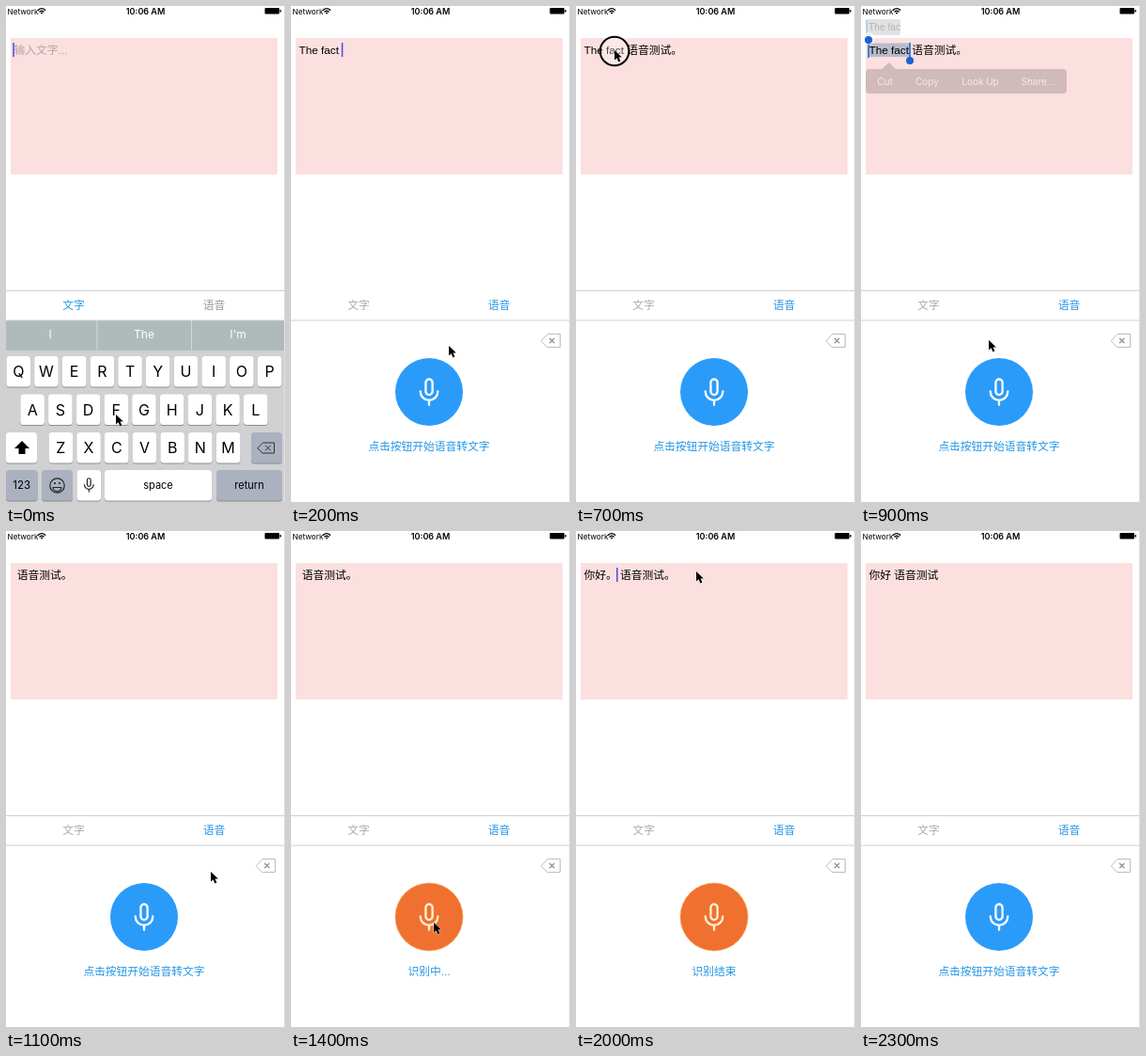
Write an HTML page that moves like this. It is 297 px wide and 528 px high and loops after 2.4 s.

```html
<!DOCTYPE html>
<html lang="zh-CN">
<head>
<meta charset="utf-8">
<title>Text and voice input</title>
<style>
html, body { margin: 0; width: 100%; height: 100%; overflow: hidden; background: #fff; }
svg { display: block; width: 297px; height: 528px; }
text { font: 11.75px "Liberation Sans", "Noto Sans CJK SC", "Noto Sans CJK", sans-serif; white-space: pre; }
.ui { font-family: Inter, "Noto Sans", sans-serif; }
.line { fill: none; stroke-linecap: round; stroke-linejoin: round; }
</style>
</head>
<body>
<svg id="stage" viewBox="0 0 297 528"></svg>
<script>
const LOOP = 2400;
const BLUE = '#2596e6', GRAY = '#aaa', RULE = '#cfcfcf';

const rect = (x, y, w, h, fill, more = '') =>
  `<rect x="${x}" y="${y}" width="${w}" height="${h}" fill="${fill}" ${more}/>`;
const text = (s, x, y, fill = '#000', more = '') =>
  `<text x="${x}" y="${y}" fill="${fill}" ${more}>${s}</text>`;
const mid = (s, x, y, fill, more = '') => text(s, x, y, fill, 'text-anchor="middle" ' + more);
const ui = (s, x, y, size, fill = '#000', weight = 400) =>
  mid(s, x, y, fill, `class="ui" style="font-size:${size}px;font-weight:${weight}"`);
const line = (d, color, width = 1) =>
  `<path class="line" d="${d}" stroke="${color}" stroke-width="${width}"/>`;
const shape = (d, fill, more = '') => `<path d="${d}" fill="${fill}" ${more}/>`;
const dot = (x, y, r, fill, more = '') => `<circle cx="${x}" cy="${y}" r="${r}" fill="${fill}" ${more}/>`;
const group = (opacity, ...parts) => `<g opacity="${opacity}">${parts.join('')}</g>`;

const mic = (x, y, k, color) => `<g transform="translate(${x} ${y}) scale(${k})">` +
  line('M-3.6-9.4a3.6 3.6 0 0 1 7.2 0v9.4a3.6 3.6 0 0 1-7.2 0zM-9.3 0a9.3 9.3 0 0 0 18.6 0M0 9.3v5', color, 2.3) + '</g>';

function statusBar() {
  return text('Network', 1.5, 8.6, '#000', 'class="ui" style="font-size:8.2px"') +
    line('M34.4 4.2a5.2 5.2 0 0 1 7.2 0M36 6a3 3 0 0 1 4 0', '#000', 1.4) + dot(38, 7.6, 1, '#000') +
    ui('10:06 AM', 148.5, 8.8, 9, '#000', 600) +
    rect(275.5, 2, 15.5, 6.5, '#000', 'rx="1"') + rect(291.5, 4, 1.5, 2.6, '#000', 'rx=".7"');
}

function key(x, y, w, label = '', dark = false, size = 16) {
  return rect(x, y + 1, w, 32.5, '#8b8d90', 'rx="3.6"') +
    rect(x, y, w, 32.5, dark ? '#abb1be' : '#fff', 'rx="3.6"') +
    ui(label, x + w / 2, y + 16.3 + size * .36, size);
}

function keyboard(words) {
  let out = rect(0, 334, 297, 194, '#d0d1d3') + rect(0, 334, 297, 32, '#afbbba') +
    rect(96.5, 334, 1, 32, '#d3d9d8') + rect(197, 334, 1, 32, '#d3d9d8');
  words.forEach((word, i) => out += ui(word, 47 + i * 100, 353.3, 12, '#fff'));
  [['QWERTYUIOP', .5, 372], ['ASDFGHJKL', 15.4, 412.5], ['ZXCVBNM', 45.6, 453]].forEach(([row, x, y]) =>
    [...row].forEach((letter, i) => out += key(x + i * 29.7, y, 25.5, letter)));
  return out + key(0, 453, 33, '') + shape('M17 462l8 8h-4.5v6h-7v-6h-4.500z', '#000') +
    key(261, 453, 33, '', true) +
    line('M268 469.500l5.500-5.500h12v11h-12zM276.500 467l5 5M281.500 467l-5 5', '#333') +
    key(0, 493, 33.5, '123', true, 11.5) + key(38, 493, 33, '', true) +
    line('M46.800 509.500a7.700 7.700 0 1 0 15.400 0a7.700 7.700 0 1 0-15.400 0M50 511.500h9a4.500 4 0 0 1-9 0', '#222', 1.2) +
    dot(52, 507, 1.1, '#222') + dot(57, 507, 1.1, '#222') +
    key(75.5, 493, 25.5) + mic(88.3, 508.5, .52, '#222') +
    key(105, 493, 114, 'space', false, 11) + key(224, 493, 70, 'return', true, 11);
}

function voicePanel(label, active) {
  return dot(147, 410, 36, active ? '#f0712f' : '#2b9bfa', active ? 'stroke="#f6a04a" stroke-width=".6"' : '') +
    mic(147, 409.5, 1, active ? '#fdf0d2' : '#fff') +
    mid(label, 147, 472, BLUE) +
    line('M266.500 355.500l6.500-7h13.500v14h-13.500z', '#bdbdbd') +
    line('M275.500 353.200l4.500 4.600M280 353.200l-4.500 4.600', '#999', 1.5) +
    rect(0, 527, 297, 1, RULE);
}

const handle = (x, y) => rect(x - .75, 39, 1.5, 16, '#1762d8') + dot(x, y, 4, '#1762d8');

const loupe = opacity => group(opacity,
  rect(5, 14, 37, 17, '#b9b6bd', 'rx="2"') + rect(5.500, 15, 1.500, 14, '#3c7be0') +
  text('The fac', 8, 26, '#444', 'style="font-size:10.200px"') +
  dot(8, 35, 6, 'none', 'stroke="#fff" stroke-width="1.500"'));

function menu(opacity) {
  const items = [['Cut', 25.5], ['Copy', 70.5], ['Look Up', 127], ['Share...', 188.5]];
  return group(opacity,
    shape('M9 67h13l7.500-7l7.500 7h178a4 4 0 0 1 4 4v18a4 4 0 0 1-4 4h-206a4 4 0 0 1-4-4v-18a4 4 0 0 1 4-4z', '#2b2b2b'),
    ...items.map(([s, x]) => ui(s, x, 83.5, 10, '#fff')));
}

const pointer = (x, y) => shape(`M${x} ${y}v10.500l2.500-2.200l1.900 4.200l2-.9l-1.900-4.100h3.300z`,
  '#000', 'stroke="#fff" stroke-width=".8" paint-order="stroke"');

function draw(s) {
  const typing = s.words;
  return rect(0, 0, 297, 528, '#fff') + statusBar() + rect(5, 34, 284, 145, '#fcdfdf') +
    (s.select ? rect(8, 39.5, 44, 14.5, '#b8bccb') : '') +
    (s.note ? text(s.note, 8.5, 50.8) : text('输入文字...', 8.5, 50.8, '#b5a5a8')) +
    (s.select ? handle(8, 36) + handle(52, 58) : '') +
    (s.caret ? rect(s.caret - .7, 39, 1.5, 15, '#4b4be0') : '') +
    (s.loupe ? loupe(s.loupe) : '') + (s.menu ? menu(s.menu) : '') +
    (s.noRule ? '' : rect(0, 302, 297, 1, RULE)) +
    mid('文字', 72, 322, typing ? BLUE : GRAY) + mid('语音', 221.500, 322, typing ? '#999' : BLUE) +
    (typing ? keyboard(typing) : voicePanel(s.label, s.active)) +
    rect(0, 333.5, 297, 1, RULE) + rect(296, 0, 1, 528, '#dedede') +
    (s.touch ? dot(s.at[0], s.at[1] + 1, 15.3, '#fff', 'fill-opacity=".3" stroke="#000" stroke-width="2"') : '') +
    (s.at ? pointer(...s.at) : '');
}

const idle = { label: '点击按钮开始语音转文字', active: false };
const busy = { label: '识别中...', active: true };
const done = { label: '识别结束', active: true };

// Each entry starts at its time and keeps whatever it does not change.
const script = [
  [0, { note: '', caret: 8, words: ['I', 'The', "I'm"], at: [117, 434] }],
  [100, { note: 'The fact ', caret: 54.5, words: ['that', 'is', 'of'], at: [214, 326] }],
  [200, { ...idle, words: null, noRule: true, at: [168, 361] }],
  [300, { noRule: false, at: [152, 410] }],
  [500, { ...busy, caret: 0, at: [152, 416] }],
  [600, { ...done, note: 'The fact 语音测试。', at: [112, 220] }],
  [700, { ...idle, at: [41, 47], touch: true }],
  [800, { select: true, loupe: 1, at: [52, 58] }],
  [900, { loupe: .4, menu: .2, touch: false, at: [136, 355] }],
  [1000, { loupe: 0, menu: .85, at: [218, 356] }],
  [1100, { note: ' 语音测试。', select: false, menu: 0, at: [218, 362] }],
  [1200, { at: [160, 408] }],
  [1300, { ...busy, at: [152, 416] }],
  [1700, { ...done, note: '你好。 语音测试。', at: [150, 380] }],
  [1800, { caret: 43.7, at: [146, 250] }],
  [1900, { at: [138, 120] }],
  [2000, { at: [128, 43] }],
  [2100, { ...idle, note: '你好 语音测试。', caret: 0, at: [274, 354] }],
  [2300, { note: '你好 语音测试', at: null }]
];

const stage = document.getElementById('stage');
let shown = -1;

function tick() {
  const time = performance.now() % LOOP;
  const count = script.filter(([start]) => start <= time).length;
  if (count !== shown) {
    shown = count;
    stage.innerHTML = draw(Object.assign({}, ...script.slice(0, count).map(entry => entry[1])));
  }
  requestAnimationFrame(tick);
}
tick();
</script>
</body>
</html>
```
